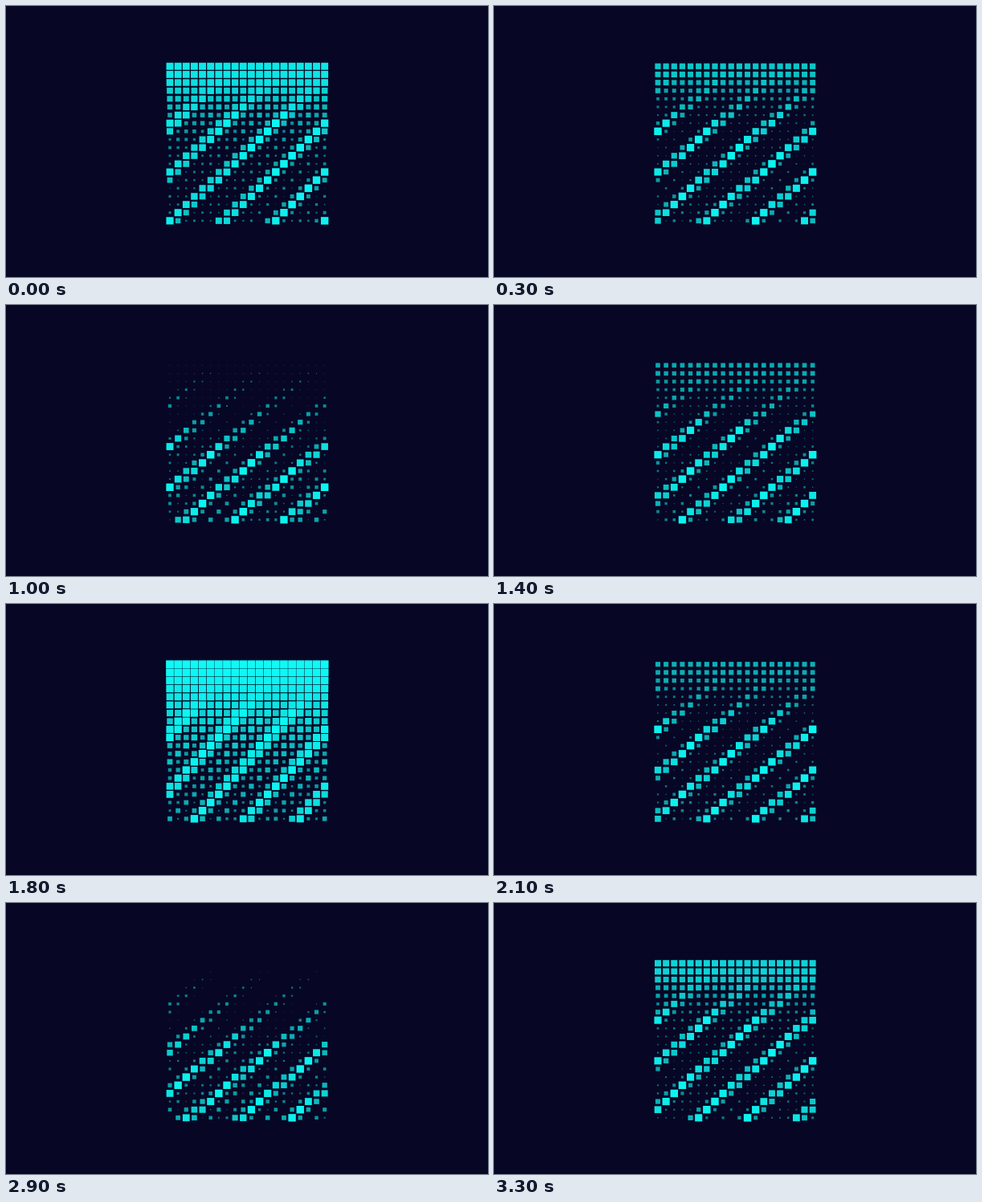
Animation of 600x338 px, one loop 3.4 s. Source, as an HTML page with a canvas:

```html
<!DOCTYPE html>
<html lang="en">
<head>
<meta charset="utf-8">
<title>Pixel wave</title>
<style>
  html, body { margin: 0; width: 100%; height: 100%; overflow: hidden; background: #070725; }
  canvas { display: block; }
</style>
</head>
<body>
<canvas id="stage" width="600" height="338"></canvas>
<script>
const ctx = document.getElementById('stage').getContext('2d');
const COUNT = 20, PITCH = 10.14, LEFT = 204, TOP = 75.2, CELL = 9.8;
const STEP = 100, CYCLE = 17, RISE = 6;
const FALL = CYCLE - RISE;

// Light at the top edge: a slow fall, then a quick rise.
function topLight(step) {
  const s = (step + CYCLE - 1) % CYCLE;
  return s < FALL ? (1 - s / FALL) ** 1.5 : Math.sqrt((s - FALL) / RISE);
}

function level(col, row, phase, light) {
  const swell = light ** 8;
  const bend = .3 * swell * (row - 2.8);
  const wave = (1 + Math.cos(col + 1.21 * row - bend - phase)) / 2;
  const glow = light * Math.exp(-((row / (4 + 7 * swell)) ** 2));
  const crest = .97 * wave ** (3 - swell);
  const trough = (.12 + .45 * swell) * (1 - wave) ** 4;
  const checker = (1 + Math.cos(2.9 * col + 2.5 * row - phase)) / 2;
  const grain = (.62 - .35 * light) * checker * row / COUNT;
  const grow = Math.min(1, row / (11 - 5 * light));
  const ripple = grow * Math.max(crest, trough, grain);
  return 1 - (1 - glow) * (1 - ripple);
}

function draw(time) {
  const step = Math.floor(time / STEP) % CYCLE;
  const phase = 2.03 + 2 * Math.PI * step / CYCLE;
  const light = topLight(step);
  ctx.fillStyle = '#070725';
  ctx.fillRect(0, 0, 600, 338);
  for (let row = 0; row < COUNT; row++) {
    for (let col = 0; col < COUNT; col++) {
      const v = level(col, row, phase, light);
      if (v < .06) continue;
      const side = CELL * v;
      ctx.fillStyle = `rgba(14, 250, 246, ${.35 + .65 * v ** 1.3})`;
      ctx.fillRect(LEFT + col * PITCH - side / 2, TOP + row * PITCH - side / 2, side, side);
    }
  }
}

const start = performance.now();
function tick() {
  draw(performance.now() - start);
  requestAnimationFrame(tick);
}
tick();
</script>
</body>
</html>
```
